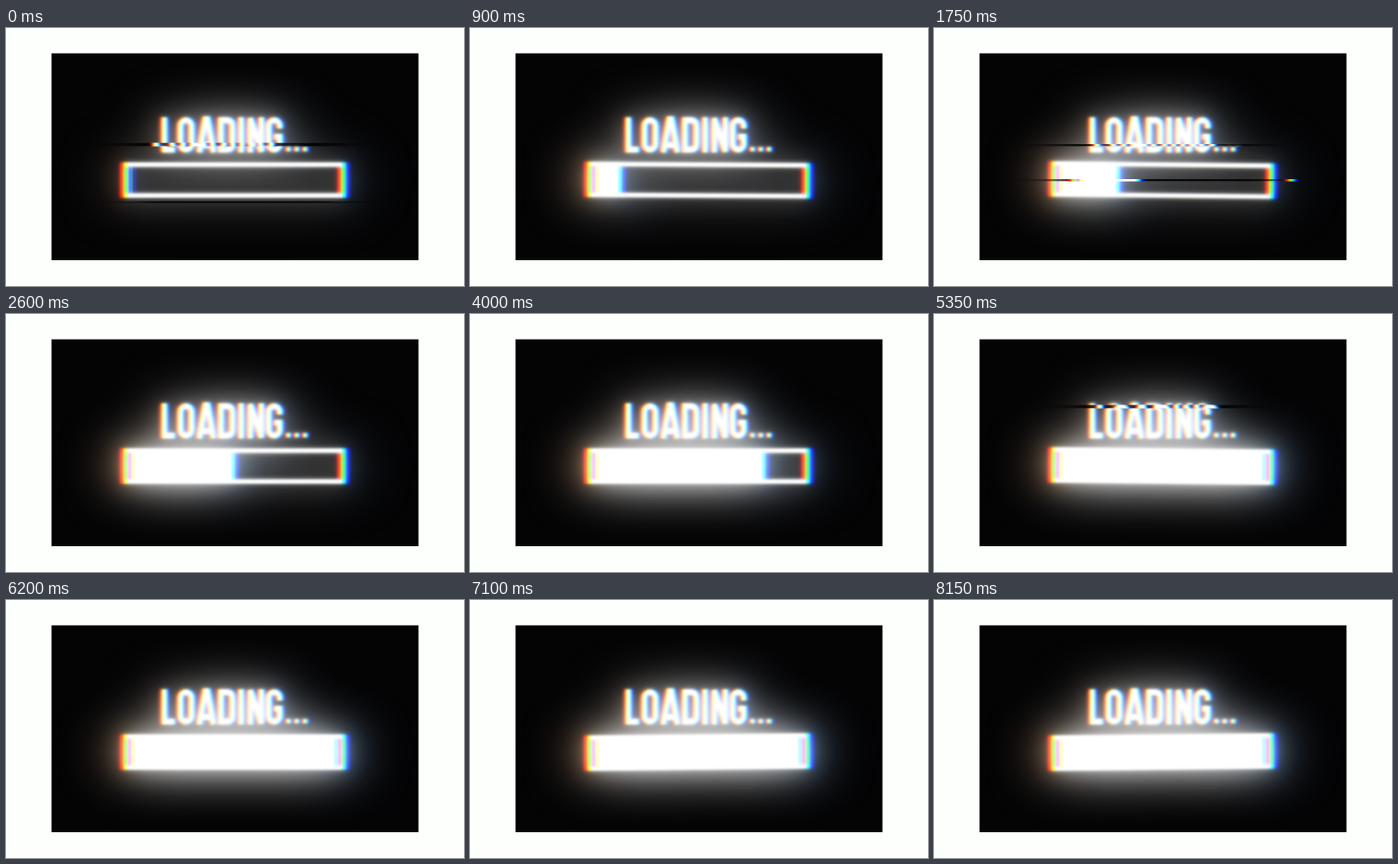
These frames come from a looping animation (498 by 280 pixels, 8.2 s). An HTML page:

```html
<!DOCTYPE html>
<html lang="en">
<head>
<meta charset="utf-8">
<title>Loading</title>
<style>
  html, body { margin: 0; width: 100%; height: 100%; overflow: hidden; background: #fcfffc; }
  svg { display: block; width: 498px; height: 280px; }
  .light { mix-blend-mode: screen; }
  #scene { isolation: isolate; }
</style>
</head>
<body>
<svg viewBox="0 0 498 280" role="img" aria-label="LOADING...">
  <defs>
    <linearGradient id="streak">
      <stop offset="0" stop-opacity="0"/>
      <stop offset=".2" stop-opacity=".85"/>
      <stop offset=".8" stop-opacity=".85"/>
      <stop offset="1" stop-opacity="0"/>
    </linearGradient>
    <clipPath id="screen"><rect x="49.500" y="27.500" width="399" height="224.500"/></clipPath>
    <g id="lettering" fill="none" stroke="#fff" stroke-width="6">
      <path d="M172.500 97V132H184"/>
      <rect x="190" y="100" width="12" height="32" rx="6"/>
      <path d="M210.500 135L217 99H219.500L226 135M213 127H223"/>
      <path d="M234 100V132H240Q246.500 132 246.500 126V106Q246.500 100 240 100Z"/>
      <path d="M256 97V135"/>
      <path d="M266 135V98L278 134V97"/>
      <path d="M298 109V106a6 6 0 0 0-12 0v20a6 6 0 0 0 12 0V118H292"/>
      <path stroke-width="4.500" d="M305 131.500h5m4 0h5m4 0h5"/>
    </g>
  </defs>

  <rect x="49.500" y="27.500" width="399" height="224.500" fill="#040405"/>
  <g clip-path="url(#screen)">
    <g id="scene">
      <use href="#core" class="light" filter="url(#wide)"/>
      <use href="#core" class="light" filter="url(#mid)"/>
      <g id="lit" class="light">
        <use href="#core" class="light" filter="url(#near)"/>
        <g id="core" class="light">
          <g filter="url(#splitText)"><use href="#lettering"/></g>
          <g filter="url(#splitBar)">
            <g id="bar" fill="#fff">
              <path fill-rule="evenodd" d="M128 146H369.500V184H128ZM133 150.500V179.500H364.500V150.500Z"/>
              <rect id="fill" x="136" y="150" height="30"/>
            </g>
          </g>
        </g>
      </g>
    </g>
    <g id="glitches"></g>
  </g>
</svg>
<script>
const LOOP = 8200, STEP = 50;
const FILL_TIME = 5200, FILL_LEFT = 136, FILL_WIDTH = 225;
const $ = id => document.getElementById(id);
const defs = document.querySelector('defs');

// Filters and glitch strips share one helper for adding SVG markup.
const add = (parent, markup) => parent.insertAdjacentHTML('beforeend', markup);
const region = 'filterUnits="userSpaceOnUse" x="0" y="0" width="498" height="280" color-interpolation-filters="sRGB"';

function addGlow(id, deviation, gain) {
  add(defs, `<filter id="${id}" ${region}>
    <feGaussianBlur stdDeviation="${deviation}"/>
    <feComponentTransfer><feFuncA type="linear" slope="${gain}"/></feComponentTransfer>
  </filter>`);
}

function addSplit(id, shift, softness) {
  const channel = (name, index, dx) => {
    const rows = [0, 1, 2].map(r => r === index ? '0 0 0 0 1' : '0 0 0 0 0').join(' ');
    return `<feColorMatrix in="soft" values="${rows} 0 0 0 1 0"/>
      <feOffset dx="${dx}" result="${name}"/>`;
  };
  add(defs, `<filter id="${id}" ${region}>
    <feGaussianBlur stdDeviation="${softness}" result="soft"/>
    ${channel('r', 0, -shift)}${channel('g', 1, 0)}${channel('b', 2, shift)}
    <feBlend in="r" in2="g" mode="screen" result="rg"/>
    <feBlend in="rg" in2="b" mode="screen"/>
  </filter>`);
}

addGlow('wide', '31 27', 1);
addGlow('mid', 12, .55);
addGlow('near', 2.8, .75);
addSplit('splitText', 2.4, 1);
addSplit('splitBar', 4, .8);

// Torn rows: visible from..to, at y with height h, displaced by dx.
const glitches = [
  { from: 0, to: 150, y: 124.5, h: 4, dx: -9, left: 88, right: 400 },
  { from: 0, to: 150, y: 188, h: 2, dx: 0, left: 104, right: 402 },
  { from: 1700, to: 1850, y: 126, h: 2.5, dx: 5, left: 94, right: 386 },
  { from: 1700, to: 1850, y: 164, h: 2.5, dx: 22, left: 88, right: 408 },
  { from: 5300, to: 5450, y: 98.5, h: 4, dx: 8, left: 118, right: 368 }
];

glitches.forEach((g, i) => {
  add(defs, `<clipPath id="row${i}"><rect x="50" y="${g.y}" width="398" height="${g.h}"/></clipPath>`);
  add($('glitches'), `<g clip-path="url(#row${i})">
    <rect x="${g.left}" y="${g.y}" width="${g.right - g.left}" height="${g.h}" fill="url(#streak)"/>
    <use href="#lit" x="${g.dx}"/>
  </g>`);
});
const strips = [...$('glitches').children];

// Bar tilt as [time, degrees].
const sway = [[0, 0], [1750, .6], [2600, 0], [4000, 0], [5350, .6], [7100, -.6], [LOOP, -.6]];

function tiltAt(t) {
  const i = sway.findIndex(([time]) => time > t);
  const [t0, a] = sway[i - 1], [t1, b] = sway[i];
  const p = (t - t0) / (t1 - t0);
  return a + (b - a) * p * p * (3 - 2 * p);
}

function draw(t) {
  const p = Math.min(1, t / FILL_TIME);
  const progress = p - .054 * Math.sin(2 * Math.PI * p);
  $('fill').setAttribute('width', 1 + progress * (FILL_WIDTH - 1));
  $('bar').setAttribute('transform', `rotate(${tiltAt(t)} 249 165)`);
  glitches.forEach((g, i) => {
    strips[i].setAttribute('display', t >= g.from && t < g.to ? 'inline' : 'none');
  });
}

const start = performance.now();
let shown = -1;
function tick() {
  const t = Math.floor((performance.now() - start) % LOOP / STEP) * STEP;
  if (t !== shown) draw(shown = t);
  requestAnimationFrame(tick);
}
tick();
</script>
</body>
</html>
```
